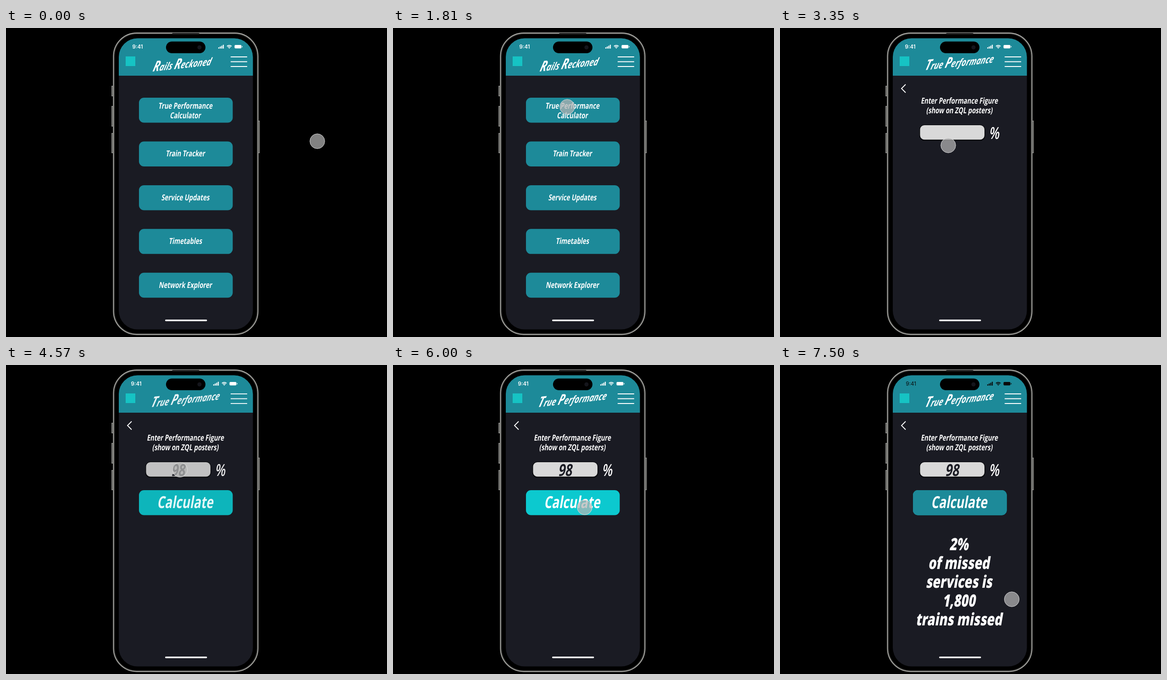
An HTML page with a canvas for the animation above (8000 ms loop, 831 by 674 pixels).

```html
<!DOCTYPE html>
<html lang="en">
<head>
<meta charset="utf-8">
<title>Train app walkthrough</title>
<style>
  html, body { margin: 0; width: 100%; height: 100%; overflow: hidden; background: #000; }
  canvas { display: block; width: 831px; height: 674px; }
</style>
</head>
<body>
<canvas id="stage" width="831" height="674"></canvas>
<script>
const ctx = document.getElementById('stage').getContext('2d');
const LOOP = 8000;
const MID = 392;
const TEAL = '#1d8a99', AQUA = '#0cc9cf', NIGHT = '#1a1b23', WHITE = '#fff';
const FACE = '"Open Sans", "Noto Sans", sans-serif';
const NARROW = 0.73;

const MENU = [['True Performance', 'Calculator'], ['Train Tracker'],
  ['Service Updates'], ['Timetables'], ['Network Explorer']];
const RESULT = ['2%', 'of missed', 'services is', '1,800', 'trains missed'];

// Pointer moves: first change, last change, steps, end point, optional bend
const MOVES = [
  { from: 1040, to: 1810, n: 12, end: [380, 172] },
  { from: 3210, to: 3350, n: 3, end: [367, 256] },
  { from: 3550, to: 3690, n: 3, end: [379.5, 228.5] },
  { from: 5110, to: 5670, n: 9, end: [418.5, 310], bend: [393, 279] },
  { from: 6000, to: 6000, n: 1, end: [418, 310.5] },
  { from: 6270, to: 6270, n: 1, end: [417.5, 310.5] },
  { from: 7150, to: 7500, n: 6, end: [505.5, 511] }
];

const clamp = v => Math.max(0, Math.min(1, v));
const smooth = p => p * p * (3 - 2 * p);
const easeOut = (p, power) => 1 - Math.pow(1 - p, power);

// Progress in held steps; the first step already shows at `from`
function steps(t, from, to, n) {
  if (t < from) return 0;
  if (t >= to) return 1;
  return clamp((Math.floor((t - from) / (to - from) * (n - 1) + 1e-6) + 1) / n);
}

function fade(alpha, paint) {
  if (alpha <= 0.001) return;
  ctx.save();
  ctx.globalAlpha = alpha;
  paint();
  ctx.restore();
}

function box(x, y, w, h, r, fill) {
  ctx.beginPath();
  ctx.roundRect(x, y, w, h, r);
  ctx.fillStyle = fill;
  ctx.fill();
}

function rim(x, y, w, h, r, color, width) {
  ctx.beginPath();
  ctx.roundRect(x, y, w, h, r);
  ctx.strokeStyle = color;
  ctx.lineWidth = width;
  ctx.stroke();
}

function line(points, color, width) {
  ctx.beginPath();
  points.forEach(([x, y]) => ctx.lineTo(x, y));
  ctx.strokeStyle = color;
  ctx.lineWidth = width;
  ctx.stroke();
}

// Condensed oblique lettering, centred on x
function label(text, x, y, size, color = WHITE, weight = 700) {
  const slant = 0.17;
  ctx.save();
  ctx.transform(NARROW, 0, -slant, 1, x - slant * size * 0.33, y);
  ctx.font = `${weight} ${size}px ${FACE}`;
  ctx.textAlign = 'center';
  ctx.fillStyle = color;
  ctx.fillText(text, 0, 0);
  ctx.restore();
}

// Rising header lettering with tall capitals
function title(text, x, y) {
  ctx.save();
  ctx.transform(NARROW, -0.11 * NARROW, -0.28, 1, x, y);
  ctx.fillStyle = WHITE;
  let pen = 0;
  for (const ch of text) {
    const size = /[A-Z]/.test(ch) ? 32 : 23;
    ctx.font = `italic 700 ${size}px ${FACE}`;
    ctx.fillText(ch, pen, 0);
    pen += ctx.measureText(ch).width;
  }
  ctx.restore();
}

function hamburger() {
  for (const y of [63, 73.5, 84]) line([[490, y], [526, y]], WHITE, 2);
}

function status(clockX, iconX, color, weight) {
  ctx.font = `${weight} 11.5px Inter, "Liberation Sans", sans-serif`;
  ctx.fillStyle = color;
  ctx.fillText('9:41', clockX, 45);
  for (let i = 0; i < 4; i++) {
    const h = 3 + i * 1.8;
    box(iconX + i * 3.3, 45 - h, 2.2, h, 0.7, color);
  }
  const x = iconX + 24, y = 45, a = Math.PI * 0.25;
  for (const r of [7.2, 4.4]) {
    ctx.beginPath();
    ctx.arc(x, y, r, -Math.PI + a, -a);
    ctx.strokeStyle = color;
    ctx.lineWidth = 1.7;
    ctx.stroke();
  }
  ctx.beginPath();
  ctx.moveTo(x, y);
  ctx.arc(x, y, 2.4, -Math.PI + a, -a);
  ctx.fillStyle = color;
  ctx.fill();
  box(iconX + 35.5, 37, 15, 7.5, 2, color);
  box(iconX + 51.8, 39.3, 1.2, 3, 0.6, color);
}

function phone() {
  for (const [x, y, h] of [[230, 126, 23], [230, 170, 45], [230, 229, 44], [550, 202, 71]]) {
    box(x, y, 3.5, h, 1, '#8f8f8c');
    line([[x + 1.7, y + 2], [x + 1.7, y + h - 2]], '#4a4a48', 1);
  }
  box(233, 9.5, 318, 660.5, 52, '#3a3a38');
  rim(234.5, 11, 315, 657.5, 50.5, '#aaaaa6', 1.8);
  box(236.5, 13, 311, 653.5, 48.5, '#000');
  rim(237, 13.5, 310, 652.5, 48, '#20201f', 1);
  box(362, 11, 60, 4, 2, '#161616');

  ctx.save();
  ctx.beginPath();
  ctx.roundRect(246, 22.5, 292.5, 635, 41);
  ctx.clip();
  ctx.fillStyle = NIGHT;
  ctx.fillRect(246, 22, 293, 636);
  ctx.fillStyle = TEAL;
  ctx.fillRect(246, 22, 293, 82);
  ctx.restore();

  box(349, 29.5, 86, 25.5, 12.75, '#000');
  ctx.beginPath();
  ctx.arc(422, 42.3, 4.5, 0, Math.PI * 2);
  ctx.fillStyle = '#15161c';
  ctx.fill();
  box(347, 636, 91.5, 3.5, 1.75, WHITE);
  box(261, 62, 21, 21, 0, '#16c3c4');
}

function home() {
  status(275.5, 463, WHITE, 600);
  title('Rails Reckoned', 319, 95);
  hamburger();
  MENU.forEach((rows, i) => {
    const y = 152 + i * 95.45;
    box(290, y, 204.5, 54.5, 11, TEAL);
    const first = rows.length > 1 ? y + 24 : y + 33;
    rows.forEach((row, k) => label(row, MID, first + k * 20.5, 18));
  });
}

function prompt() {
  line([[274, 123], [265, 132], [274, 141]], WHITE, 1.8);
  label('Enter Performance Figure', MID, 165, 18);
  label('(show on ZQL posters)', MID, 185.5, 18);
}

function form() {
  title('True Performance', 315, 92);
  hamburger();
  box(304, 211, 143.5, 35, 11, '#07080b');
  box(305.5, 212, 140.5, 31.5, 9.5, '#d9d9d9');
  label('%', 468.5, 242, 36, WHITE, 600);
}

function answered(done) {
  form();
  label('98', 377, 242, 36, NIGHT);
  box(290, 273, 204.5, 54.5, 11, AQUA);
  if (done > 0) fade(done, () => box(290, 273, 204.5, 54.5, 11, TEAL));
  label('Calculate', 392.5, 311.5, 36);
}

function pointer(t) {
  let pos = [679, 247];
  for (const m of MOVES) {
    if (t < m.from) break;
    const step = steps(t, m.from, m.to, m.n);
    const p = m.bend ? step : smooth(step);
    const a = pos;
    pos = m.end.map((b, i) => {
      const c = m.bend ? m.bend[i] : (a[i] + b) / 2;
      return (1 - p) * (1 - p) * a[i] + 2 * p * (1 - p) * c + p * p * b;
    });
  }
  ctx.beginPath();
  ctx.arc(pos[0], pos[1], 16.2, 0, Math.PI * 2);
  ctx.fillStyle = 'rgba(180,180,180,0.72)';
  ctx.fill();
  ctx.strokeStyle = 'rgba(230,230,230,0.85)';
  ctx.lineWidth = 1;
  ctx.stroke();
}

function draw(t) {
  const open = easeOut(steps(t, 2410, 2810, 7), 2.6);
  const filled = easeOut(steps(t, 4290, 4780, 8), 2.2);
  const done = easeOut(steps(t, 6410, 6890, 8), 3.3);

  ctx.fillStyle = '#000';
  ctx.fillRect(0, 0, 831, 674);
  phone();
  fade(1 - open, home);
  fade(open, prompt);
  fade(open * (1 - done), () => status(272.5, 452, WHITE, 600));
  fade(done, () => status(274.5, 452, '#0a0a0a', 400));
  fade(open * (1 - filled), form);
  fade(filled, () => answered(done));
  fade(done, () => RESULT.forEach((row, i) => label(row, MID, 404 + i * 41, 37, WHITE, 800)));
  pointer(t);
}

function tick(now) {
  draw(now % LOOP);
  requestAnimationFrame(tick);
}
requestAnimationFrame(tick);
</script>
</body>
</html>
```
